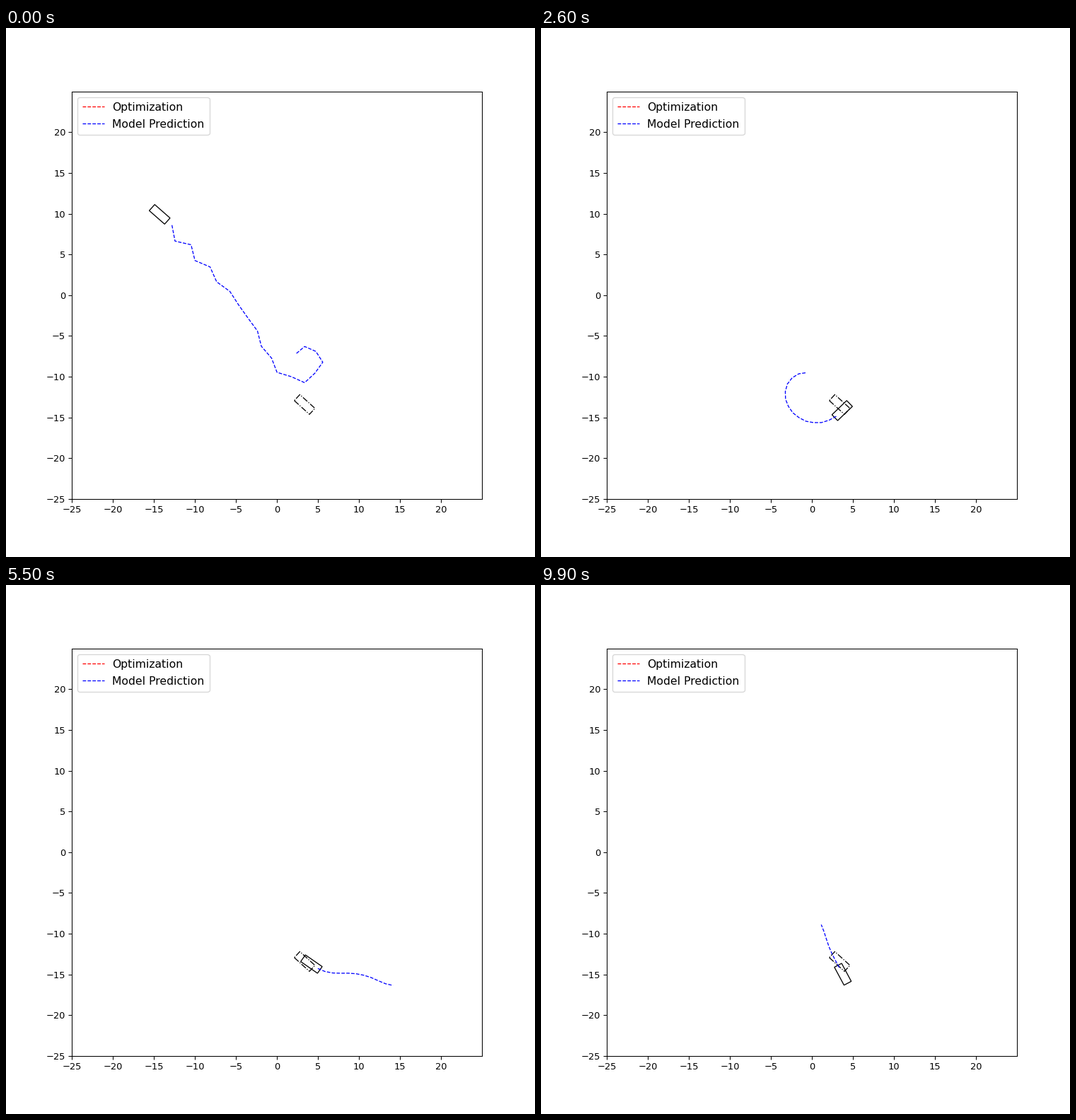
Write a matplotlib script that moves like this. It is 748 px wide and 748 px high and loops after 10000 ms.

```python
import numpy as np
import matplotlib.pyplot as plt
from matplotlib.animation import FuncAnimation
from matplotlib.patches import Rectangle

SIZE, DPI = 748, 93.5
FRAMES, INTERVAL = 100, 100
LENGTH, WIDTH = 2.5, 1.0
GOAL = (3.37, -13.42, -42.5)

# Key poses of the drive: step, x, y, heading in degrees
POSES = np.array([
    (0, -14.30, 9.92, -41.5),
    (10, -0.12, -4.01, -55),
    (16, 3.25, -13.48, -95),
    (20, 4.80, -17.64, 3),
    (23, 6.44, -14.34, 115),
    (26, 3.68, -14.17, 224),
    (33, 2.90, -16.43, 330),
    (38, 6.78, -16.08, 40),
    (42, 7.99, -12.56, 73),
    (46, 6.35, -9.57, 178),
    (50, 3.68, -11.65, 235),
    (55, 4.20, -13.74, 325),
    (61, 5.49, -16.51, 245),
    (66, 2.64, -17.47, 165),
    (69, 1.91, -16.43, 102),
    (73, 2.38, -13.39, 60),
    (79, 9.72, -12.26, -60),
    (85, 5.79, -15.43, 194),
    (89, 2.82, -17.47, 265),
    (94, 5.23, -17.73, 80),
    (99, 3.76, -14.99, 118),
])

# Steering of the predicted path: step, number of points,
# then degrees turned per point at five even places along it
STEERING = np.array([
    (0, 20, -3, 0, -6, 35, 60),
    (10, 20, -5, -5, 40, 38, -70),
    (26, 14, -14, -14, -14, -20, -24),
    (42, 14, 36, 34, 2, -28, -18),
    (69, 7, -12, -13, -16, 16, 50),
    (85, 20, -28, -15, 35, 40, -35),
    (99, 7, 0, 0, -6, 0, 8),
])


def rush(t):
    """1 on the long approach, 0 once the car circles the goal."""
    return np.exp(-(t / 20) ** 4)


def speed(t):
    return 0.95 + 1.05 * rush(t)


def direction(angle):
    return np.stack([np.cos(angle), np.sin(angle)], axis=-1)


def pose(k):
    """Position and heading on a Hermite curve through the key poses."""
    t = POSES[:, 0]
    i = np.clip(np.searchsorted(t, k, side="right") - 1, 0, len(t) - 2)
    h = t[i + 1] - t[i]
    u = (k - t[i]) / h
    p, q = POSES[i:i + 2, 1:3]
    v, w = (h * speed(t[i:i + 2])[:, None]
            * direction(np.radians(POSES[i:i + 2, 3])))
    a, b = 2 * (p - q) + v + w, 3 * (q - p) - 2 * v - w
    position = ((a * u + b) * u + v) * u + p
    dx, dy = (3 * a * u + 2 * b) * u + v
    return position, np.arctan2(dy, dx)


def predict(k, position, heading):
    """Roll the car forward with the steering planned at step k."""
    count, *turns = [np.interp(k, STEERING[:, 0], column)
                     for column in STEERING.T[1:]]
    j = np.arange(round(count))
    u = j / count
    turn = np.interp(u, np.linspace(0, 1, len(turns)), turns)
    # Fast plans zigzag, with a slow beat
    zigzag = (36 * rush(k) * (1 - u ** 2)
              * (-1.0) ** (j + k) * np.cos(np.pi * (j + k) / 16))
    turn[0] = zigzag[0] = 0
    angle = heading + np.radians(np.cumsum(turn) + zigzag)
    strides = speed(k + j)[:, None] * direction(angle)
    return position + np.cumsum(strides, axis=0)


def box(x, y, angle, **style):
    return Rectangle((x - LENGTH / 2, y - WIDTH / 2), LENGTH, WIDTH,
                     angle=angle, rotation_point="center",
                     fill=False, ec="black", lw=1, **style)


fig = plt.figure(figsize=(SIZE / DPI, SIZE / DPI), dpi=DPI, facecolor="white")
ax = fig.add_axes([0.1245, 0.11, 0.7755, 0.77])
ticks = np.arange(-25, 25, 5)
ax.set(xlim=(-25, 25), ylim=(-25, 25), xticks=ticks, yticks=ticks)

ax.plot([], [], "r--", lw=1, label="Optimization")
prediction, = ax.plot([], [], "b--", lw=1, label="Model Prediction")
ax.legend(loc="upper left", fontsize=12, labelspacing=0.6, borderpad=0.45,
          handletextpad=0.72)

ax.add_patch(box(*GOAL, ls="dashdot"))
car = ax.add_patch(box(0, 0, 0))


def update(k):
    position, heading = pose(k)
    car.set_xy(position - (LENGTH / 2, WIDTH / 2))
    car.set_angle(np.degrees(heading))
    prediction.set_data(*predict(k, position, heading).T)
    return car, prediction


anim = FuncAnimation(fig, update, frames=FRAMES, interval=INTERVAL,
                     repeat=True, repeat_delay=0, blit=False)
plt.show()
```
